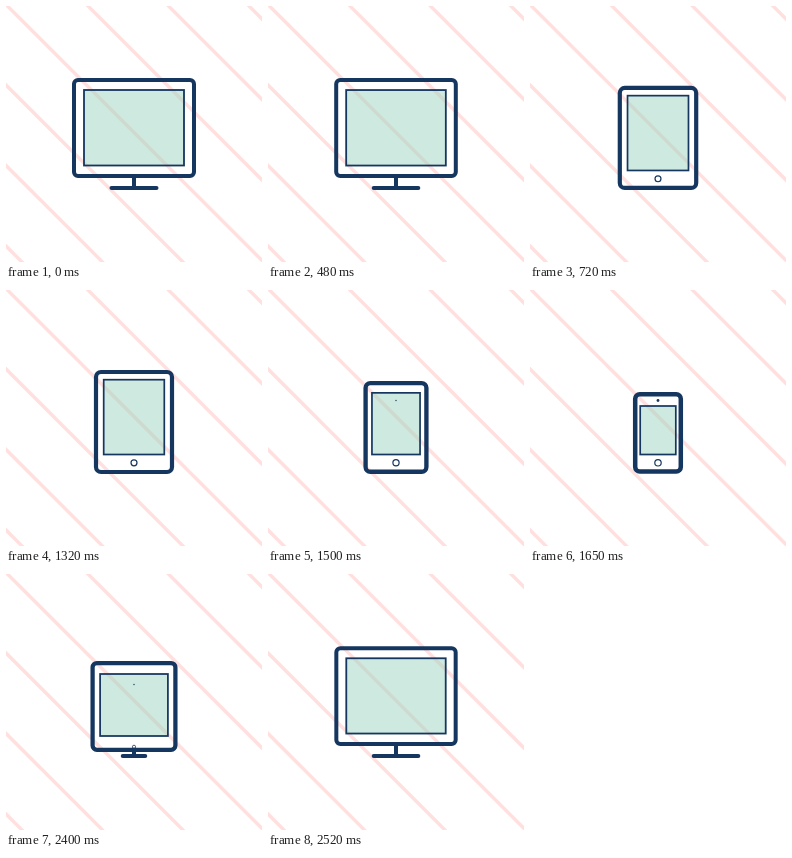
Recreate the animation shown at these times as an HTML page. Size 256 by 256 pixels, loop 2550 ms.

```html
<!DOCTYPE html>
<html lang="en">
<head>
<meta charset="utf-8">
<title>Responsive devices</title>
<style>
  html, body { margin: 0; width: 100%; height: 100%; overflow: hidden; background: #fff; }
  svg { display: block; width: 100vw; height: 100vh; }
  .line { stroke: #15365f; fill: none; }
</style>
</head>
<body>
<svg viewBox="0 0 256 256">
  <g id="stripes" stroke="#ffe0df" stroke-width="3.4"></g>
  <path id="stand" class="line" stroke-width="4" stroke-linecap="round"/>
  <path id="neck" class="line" stroke-width="4"/>
  <rect id="body" class="line"/>
  <rect id="screen" class="line" style="fill: rgb(158 211 191 / .5)"/>
  <circle id="button" class="line" cx="128"/>
  <circle id="camera" cx="128" cy="110.5" fill="#15365f"/>
</svg>
<script>
const LOOP = 2550, STEP = 30, MORPH = 300;
const $ = id => document.getElementById(id);
const set = (id, attrs) => {
  for (const name in attrs) $(id).setAttribute(name, attrs[name]);
};

// Boxes are [half width, top, bottom] around x = 128.
const monitor = { body: [60, 74, 170], screen: [50, 84, 159.5], radius: 4, line: 4, thin: 1.8, stand: 1, button: 0, camera: 0 };
const tablet = { body: [38, 82, 182], screen: [30.3, 89.7, 164.5], radius: 5, line: 4.2, thin: 1.7, stand: 0, button: 3, camera: 0 };
const phone = { body: [22.8, 104.2, 181.6], screen: [17.8, 116, 164.5], radius: 4.5, line: 4.5, thin: 1.7, stand: 0, button: 3.2, camera: 1.4 };
const morphs = [
  [450, monitor, tablet],
  [1350, tablet, phone],
  [2250, phone, monitor]
];

const ease = t => t < .5 ? (2 * t) ** 2.5 / 2 : 1 - (2 - 2 * t) ** 2.5 / 2;
const mix = (a, b, p) => Array.isArray(a) ? a.map((v, i) => mix(v, b[i], p)) : a + (b - a) * p;

function poseAt(time) {
  const [start, from, to] = morphs.findLast(m => time >= m[0]) || [0, monitor, monitor];
  const p = ease(Math.min(1, (time - start) / MORPH));
  return Object.fromEntries(Object.keys(from).map(key => [key, mix(from[key], to[key], p)]));
}

const setBox = (id, [half, top, bottom], attrs) =>
  set(id, { x: 128 - half, y: top, width: 2 * half, height: bottom - top, ...attrs });

function draw(time) {
  const pose = poseAt(time), shown = pose.stand > .01;
  setBox('body', pose.body, { rx: pose.radius, 'stroke-width': pose.line });
  setBox('screen', pose.screen, { 'stroke-width': pose.thin });
  const reach = 22.5 * pose.stand;
  set('stand', { d: `M${128 - reach} 182H${128 + reach}`, opacity: +shown });
  set('neck', { d: `M128 ${Math.min(182, pose.body[2])}V182`, opacity: +shown });
  set('button', { cy: 172.8, r: pose.button, 'stroke-width': Math.min(1.2, pose.button / 2) });
  set('camera', { r: pose.camera });
}

for (let x = -240; x <= 250; x += 80.5) {
  const line = document.createElementNS('http://www.w3.org/2000/svg', 'path');
  line.setAttribute('d', `M${x - 10} -10l280 280`);
  $('stripes').append(line);
}

function tick(now) {
  draw(Math.floor(now % LOOP / STEP) * STEP);
  requestAnimationFrame(tick);
}
draw(0);
requestAnimationFrame(tick);
</script>
</body>
</html>
```
